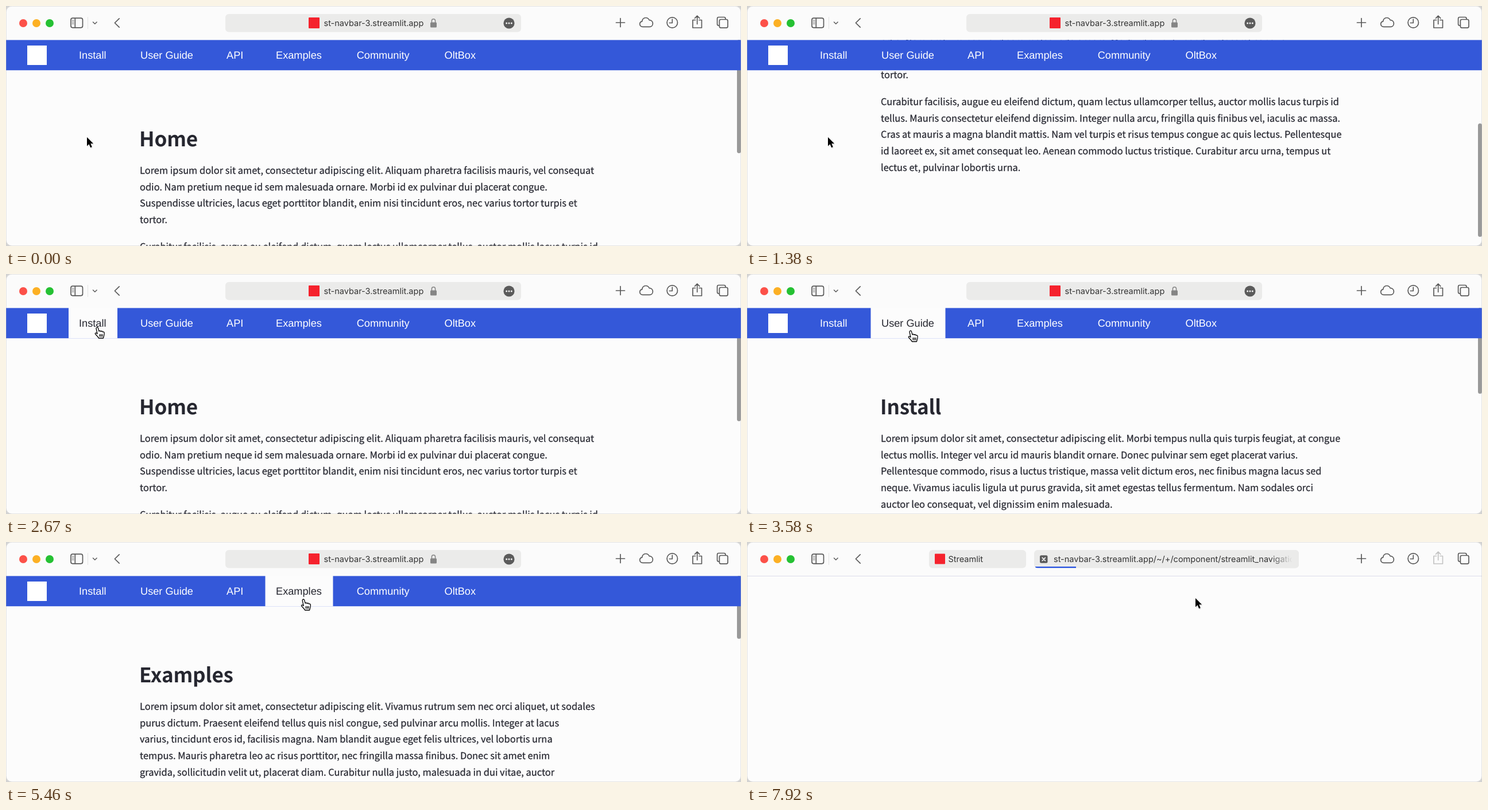
Animation of 1280 by 419 pixels, one loop 8 s. Source, as an HTML page:

```html
<!DOCTYPE html>
<html lang="en">
<head>
<meta charset="utf-8">
<title>Navigation bar demo</title>
<style>
  html, body { margin: 0; width: 100%; height: 100%; overflow: hidden; background: #d2d2d2; }
  svg { display: block; width: 1280px; height: 419px; }
  text { white-space: pre; text-rendering: geometricPrecision; }
  .body { font: 16.41px "Noto Sans CJK JP", "Noto Sans CJK", "Noto Sans CJK SC", "Open Sans", sans-serif; fill: #262730; stroke: #262730; stroke-width: .25; }
  .title { font-size: 35.1px; font-weight: 700; letter-spacing: -.005em; stroke: none; }
  .nav { font: 18.2px "Liberation Sans", Arial, sans-serif; fill: #fff; }
  .bar { font: 14.5px Inter, sans-serif; fill: #333; }
  .icon { fill: none; stroke: #5a5a5a; stroke-width: 1.7; stroke-linecap: round; stroke-linejoin: round; }
</style>
</head>
<body>
<svg viewBox="0 0 1280 419">
  <defs>
    <clipPath id="window"><rect width="1280" height="419" rx="10"/></clipPath>
    <clipPath id="tabShape"><rect id="tabClip" y="14" height="31.5" rx="6"/></clipPath>
    <linearGradient id="fade">
      <stop offset="0" stop-color="#ebebea" stop-opacity="0"/>
      <stop offset="1" stop-color="#ebebea"/>
    </linearGradient>
  </defs>
  <g clip-path="url(#window)">
    <rect width="1280" height="419" fill="#fcfcfc"/>

    <g id="site">
      <g id="pages"></g>
      <rect id="thumb" x="1273" width="7" rx="3.5" fill="#999"/>
      <rect y="59.4" width="1280" height="52.8" fill="#3458d9"/>
      <rect id="active" y="59" height="53.2" fill="#fcfcfc"/>
      <rect x="37" y="69" width="34" height="34" fill="#fff"/>
      <g id="links" class="nav"></g>
    </g>

    <rect width="1280" height="59" fill="#fbfbfb"/>
    <rect y="59" width="1280" height="1" fill="#dcdcea" id="edge"/>
    <circle cx="30" cy="30" r="7" fill="#fc5149"/>
    <circle cx="53" cy="30" r="7" fill="#fcb024"/>
    <circle cx="76" cy="30" r="7" fill="#25c133"/>
    <path d="M142.5 19V40" stroke="#e4e4e4"/>
    <g class="icon">
      <rect x="113" y="21.2" width="20.5" height="16.6" rx="3"/>
      <path d="M120.3 21.5V37.5"/>
      <path d="M115.3 25H118M115.3 28H118M115.3 31H118" stroke-width="1.2"/>
      <path d="M151.5 28L154.8 31.3L158.1 28" stroke-width="1.5"/>
      <path d="M197.2 21.8L189.4 29.5L197.2 37.2"/>
    </g>
    <g class="icon" transform="translate(0 -.5)">
      <path d="M1062.5 29.5H1077.5M1070 22V37"/>
      <path d="M1109 36.8C1105.8 36.8 1103.8 34.6 1103.8 32C1103.8 29.4 1105.6 27.6 1107.8 27.3C1107.8 23.6 1110.6 21 1114 21C1117 21 1119.2 22.6 1120.3 25.2C1123.8 25 1126.4 27.6 1126.4 31C1126.4 34.4 1124 36.8 1120.8 36.8Z"/>
      <circle cx="1160.3" cy="29.5" r="9.2"/>
      <path d="M1160.3 23.5V30H1155.3"/>
      <path id="share" d="M1200.5 25H1196V38.5H1211.5V25H1207M1203.7 32V18M1199.6 21.8L1203.7 17.7L1207.8 21.8"/>
      <path d="M1241.6 34.5H1241C1239.6 34.5 1238.6 33.5 1238.6 32V22.5C1238.6 21 1239.6 20 1241 20H1250.5C1252 20 1253 21 1253 22.5V23.5"/>
      <rect x="1242.4" y="24" width="14.6" height="14.6" rx="2.5"/>
    </g>

    <rect id="pill" y="14" height="31.5" rx="6" fill="#ebebea"/>
    <g id="address">
      <rect x="527" y="20" width="19" height="19" rx="1" fill="#f5222d"/>
      <text class="bar" x="553.5" y="35.3">st-navbar-3.streamlit.app</text>
      <rect x="739" y="28.5" width="11" height="9" rx="1.6" fill="#858585"/>
      <path d="M741.4 29V26C741.4 21.8 747.6 21.8 747.6 26V29" fill="none" stroke="#858585" stroke-width="1.5"/>
      <circle cx="876" cy="30" r="9.6" fill="#5b5b5b"/>
      <g fill="#f2f2f2">
        <circle cx="871.7" cy="30" r="1.5"/><circle cx="876" cy="30" r="1.5"/><circle cx="880.3" cy="30" r="1.5"/>
      </g>
    </g>
    <g id="oldTab">
      <rect x="327" y="20.5" width="18" height="18" rx="1" fill="#f5222d"/>
      <text class="bar" x="350.5" y="35.3">Streamlit</text>
    </g>
    <g id="newTab" clip-path="url(#tabShape)">
      <rect x="500" y="14" width="461" height="32" fill="#ebebea"/>
      <rect x="510" y="23.2" width="13.5" height="13.5" rx="2.5" fill="#5b5b5b"/>
      <path d="M514.2 27.4L519.4 32.6M519.4 27.4L514.2 32.6" stroke="#fff" stroke-width="1.5" stroke-linecap="round"/>
      <text class="bar" x="534" y="35.3">st-navbar-3.streamlit.app/~/+/component/streamlit_navigation</text>
      <rect x="912" y="14" width="38" height="32" fill="url(#fade)"/>
      <rect x="949.5" y="14" width="12" height="32" fill="#ebebea"/>
      <rect id="progress" x="502" y="43" height="2.5" fill="#2450e0"/>
    </g>

    <g id="arrow">
      <path d="M0 0V15.6L3.6 12.3L6.1 18.2L8.8 17L6.3 11.3H11.2Z" transform="translate(1 1.5)" fill="#000" opacity=".15"/>
      <path d="M0 0V15.6L3.6 12.3L6.1 18.2L8.8 17L6.3 11.3H11.2Z" fill="#000" stroke="#fff" stroke-width="1.2" paint-order="stroke"/>
    </g>
    <g id="hand" stroke="#000" stroke-width="1.3" stroke-linejoin="round" stroke-linecap="round">
      <path fill="#fff" d="M-2 2C-2-.6 1-.6 1.6 1.8L3 7C3.4 5.6 5.8 5.8 6 7.4C7 6.2 9 6.6 9.2 8.2C10.4 7.4 12.2 8.2 12.2 10C12.2 14 11.6 15 10.4 19H2.4C1.4 16.4-1.6 14-3.4 11.8C-4.4 10.2-2.6 9-.8 10.8L0 11.4Z"/>
      <path fill="none" d="M4.2 12.5V16M6.5 12.5V16M8.8 12.5V16"/>
    </g>
  </g>
  <rect x=".25" y=".25" width="1279.5" height="418.5" rx="10" fill="none" stroke="#bdbdbd" stroke-width=".5"/>
</svg>

<script>
const $ = id => document.getElementById(id);
const LOOP = 8000, LEFT = 233, LINE = 28.7, TOP = 59;

// label, text x, highlight left, highlight right
const links = [
  ["Install", 127, 109, 194],
  ["User Guide", 234, 215.5, 345.5],
  ["API", 384, 365.5, 432],
  ["Examples", 470, 451.5, 569.5],
  ["Community", 610.7, 590.5, 724],
  ["OltBox", 763.5, 744, 840]
];

const lorem = "Lorem ipsum dolor sit amet, consectetur adipiscing elit. ";
const pages = [
  { title: "Home", thumb: 198, text: [[
    lorem + "Aliquam pharetra facilisis mauris, vel consequat",
    "odio. Nam pretium neque id sem malesuada ornare. Morbi id ex pulvinar dui placerat congue.",
    "Suspendisse ultricies, lacus eget porttitor blandit, enim nisi tincidunt eros, nec varius tortor turpis et",
    "tortor."
  ], [
    "Curabitur facilisis, augue eu eleifend dictum, quam lectus ullamcorper tellus, auctor mollis lacus turpis id",
    "tellus. Mauris consectetur eleifend dignissim. Integer nulla arcu, fringilla quis finibus vel, iaculis ac massa.",
    "Cras at mauris a magna blandit mattis. Nam vel turpis et risus tempus congue ac quis lectus. Pellentesque",
    "id laoreet ex, sit amet consequat leo. Aenean commodo luctus tristique. Curabitur arcu urna, tempus ut",
    "lectus et, pulvinar lobortis urna."
  ]] },
  { title: "Install", thumb: 150, text: [[
    lorem + "Morbi tempus nulla quis turpis feugiat, at congue",
    "lectus mollis. Integer vel arcu id mauris blandit ornare. Donec pulvinar sem eget placerat varius.",
    "Pellentesque commodo, risus a luctus tristique, massa velit dictum eros, nec finibus magna lacus sed",
    "neque. Vivamus iaculis ligula ut purus gravida, sit amet egestas tellus fermentum. Nam sodales orci",
    "auctor leo consequat, vel dignissim enim malesuada."
  ]] },
  { title: "User guide", thumb: 57, text: [[
    lorem + "Ut ornare, nulla quis tristique imperdiet, metus",
    "sapien ullamcorper magna, nec volutpat quam nulla egestas neque. Sed cursus nisl ligula, ut ullamcorper",
    "quam gravida a. Donec elementum enim nec nulla vehicula fermentum. Donec semper efficitur purus, ac",
    "tempor quam volutpat eu. Suspendisse potenti. Pellentesque quam erat, feugiat ac metus ut, commodo",
    "suscipit mauris. Duis ut massa maximus, porta tortor at, hendrerit velit. Integer nec turpis justo. Ut"
  ]] },
  { title: "API", thumb: 90, text: [[
    lorem + "Sed vehicula purus at nisl tempor, nec gravida",
    "mauris cursus. Aenean porta velit ut massa hendrerit, quis feugiat erat suscipit. Nulla semper metus",
    "justo, eu maximus sapien volutpat in. Phasellus egestas quam id lectus elementum, vel iaculis tortor",
    "imperdiet. Duis potenti neque, commodo ac turpis sed, efficitur ornare ligula. Cras tincidunt enim a",
    "arcu blandit, sit amet laoreet nunc pretium. Vestibulum dictum orci vel urna mattis, eget luctus"
  ]] },
  { title: "Examples", thumb: 110, text: [[
    lorem + "Vivamus rutrum sem nec orci aliquet, ut sodales",
    "purus dictum. Praesent eleifend tellus quis nisl congue, sed pulvinar arcu mollis. Integer at lacus",
    "varius, tincidunt eros id, facilisis magna. Nam blandit augue eget felis ultrices, vel lobortis urna",
    "tempus. Mauris pharetra leo ac risus porttitor, nec fringilla massa finibus. Donec sit amet enim",
    "gravida, sollicitudin velit ut, placerat diam. Curabitur nulla justo, malesuada in dui vitae, auctor"
  ]] },
  { title: "Community", thumb: 117, text: [[
    lorem + "Ut scelerisque ultrices felis at ornare. In quis",
    "elementum diam. Phasellus facilisis laoreet eros, sed blandit neque sollicitudin at. Vivamus aliquet",
    "vehicula nunc, eget tempus tortor gravida quis. Ut rutrum orci velit, sit amet egestas sem elementum id.",
    "Nam dignissim sem lectus, in tristique nisl dignissim et. Vestibulum eleifend commodo purus non",
    "vestibulum. Pellentesque est lectus, tempus blandit ipsum eleifend, pulvinar sodales lacus. Praesent"
  ]] }
];

// Click times; each page follows its click after LOAD ms
const clicks = [2600, 3500, 4480, 5270, 6130];
const LOAD = 110, NEW_TAB = 7330, TAB_TIME = 200;

// time, x, y of the pointer
const path = [
  [2150, 141, 229], [2560, 159, 93], [2850, 159, 93], [3400, 285, 99],
  [3760, 285, 99], [4300, 408, 103], [4680, 408, 103], [5180, 518, 100],
  [5450, 518, 100], [6060, 703, 99], [6560, 703, 99], [7080, 781, 98]
];

const smooth = (t, a, b) => {
  const u = Math.min(1, Math.max(0, (t - a) / (b - a)));
  return u * u * (3 - 2 * u);
};
const mix = (a, b, u) => a + (b - a) * u;
const set = (el, attrs) => { for (const k in attrs) el.setAttribute(k, attrs[k]); };
const show = (el, on) => set(el, { visibility: on ? "visible" : "hidden" });

function add(parent, tag, attrs, content = "") {
  const el = document.createElementNS("http://www.w3.org/2000/svg", tag);
  set(el, attrs);
  el.textContent = content;
  return parent.appendChild(el);
}

const labels = links.map(([label, x]) => add($("links"), "text", { x, y: 92 }, label));

const views = pages.map(({ title, text }) => {
  const g = add($("pages"), "g", { class: "body" });
  add(g, "text", { x: LEFT - 1, y: 244.7, class: "title" }, title);
  let y = 293;
  for (const lines of text) {
    for (const line of lines) {
      add(g, "text", { x: LEFT, y }, line);
      y += LINE;
    }
    y += 18.2;
  }
  return g;
});

function pointer(t) {
  let i = path.findIndex(p => p[0] > t);
  if (i < 0) i = path.length;
  const a = path[Math.max(0, i - 1)], b = path[Math.min(i, path.length - 1)];
  const u = a === b ? 0 : smooth(t, a[0], b[0]);
  return [mix(a[1], b[1], u), mix(a[2], b[2], u)];
}

function drawSite(t) {
  const active = clicks.filter(c => t >= c).length - 1;
  const page = clicks.filter(c => t >= c + LOAD).length;
  views.forEach((v, i) => show(v, i === page && t < NEW_TAB));

  const back = 1 - smooth(t, 1600, 2150);
  const scroll = 253 * smooth(t, 151, 1380) * back;
  const slide = 146 * smooth(t, 327, 1380) * back;
  set(views[0], { transform: `translate(0 ${-scroll})` });
  set($("thumb"), { y: TOP + slide, height: pages[page].thumb });

  show($("active"), active >= 0 && t < NEW_TAB);
  if (active >= 0) {
    const [, , l, r] = links[active];
    set($("active"), { x: l, width: r - l });
  }
  labels.forEach((el, i) => set(el, { fill: i === active ? "#262730" : "#fff" }));
  set($("site"), { display: t < NEW_TAB ? "inline" : "none" });
  show($("edge"), t >= NEW_TAB);
}

function drawTabs(t) {
  const u = smooth(t, NEW_TAB, NEW_TAB + TAB_TIME);
  const tab = mix(961, 500, u);
  set($("pill"), { x: mix(382, 317, u), width: mix(515, 169, u) });
  set($("address"), { display: u > 0 ? "none" : "inline" });
  set($("oldTab"), { opacity: u });
  set($("newTab"), { opacity: u });
  set($("tabClip"), { x: tab, width: 961 - tab });
  set($("progress"), { width: 71 * smooth(t, NEW_TAB + 100, NEW_TAB + 450) });
  set($("share"), { stroke: t >= NEW_TAB ? "#c4c4c4" : "#5a5a5a" });
}

function drawPointer(t) {
  const [x, y] = pointer(t);
  const over = t < NEW_TAB && y < 112 && links.some(([, , l, r]) => x > l && x < r);
  for (const id of ["arrow", "hand"]) {
    set($(id), { transform: `translate(${x} ${y})` });
    show($(id), (id === "hand") === over);
  }
}

function frame() {
  const t = performance.now() % LOOP;
  drawSite(t);
  drawTabs(t);
  drawPointer(t);
  requestAnimationFrame(frame);
}
frame();
</script>
</body>
</html>
```
